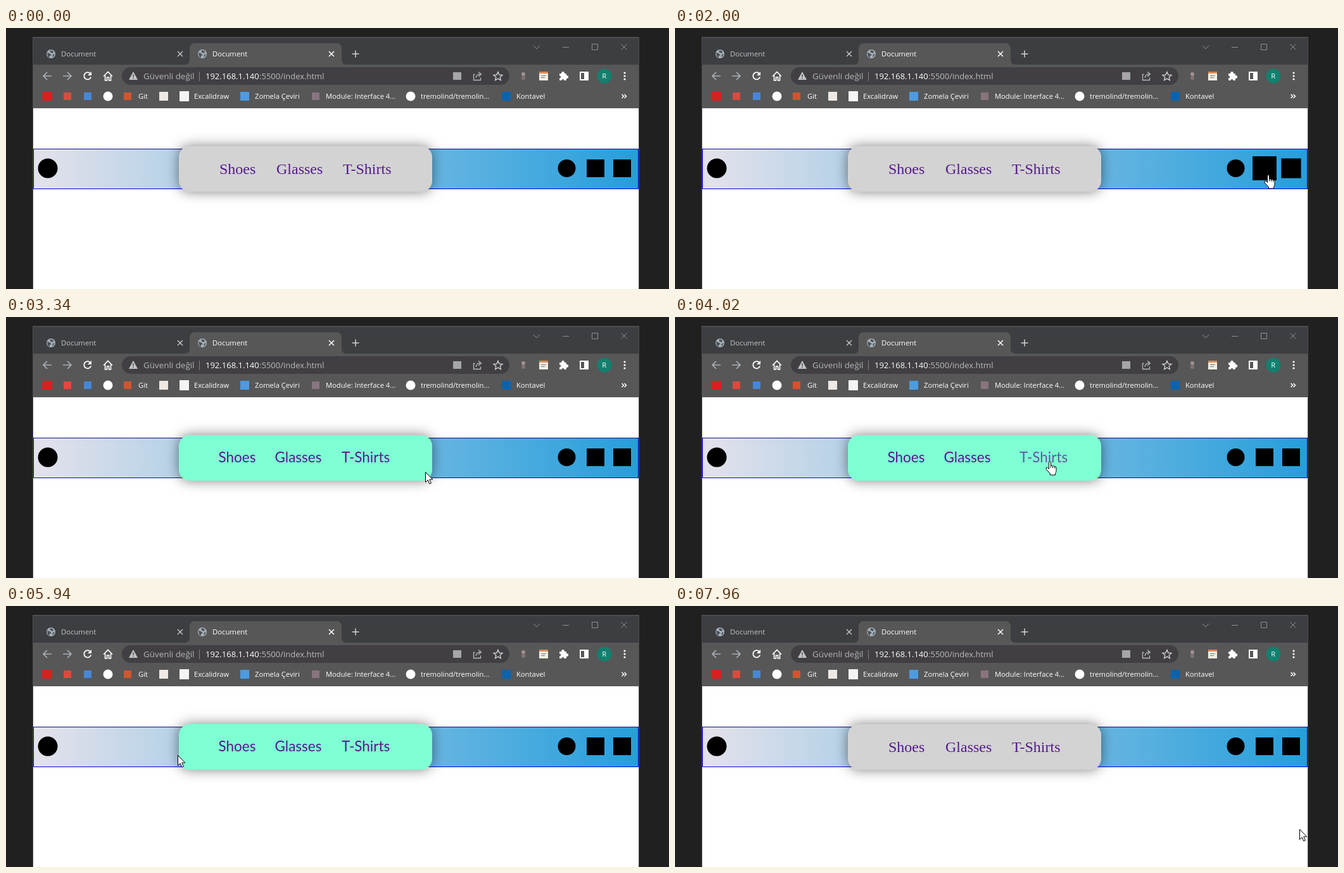
Recreate the animation shown at these times as an HTML page with a canvas. Size 1047x413 px, loop 8 s.

```html
<!DOCTYPE html>
<html lang="tr">
<head>
<meta charset="utf-8">
<title>Menu hover</title>
<style>
html, body { margin: 0; width: 100%; height: 100%; overflow: hidden; background: #202020; }
canvas { display: block; width: 1047px; height: 413px; }
</style>
</head>
<body>
<canvas id="stage"></canvas>
<script>
const W = 1047, H = 413, LOOP = 8000;
const UI = '"Open Sans", "Noto Sans", sans-serif';
const canvas = document.getElementById('stage');
const c = canvas.getContext('2d');
const dpr = window.devicePixelRatio || 1;
canvas.width = W * dpr;
canvas.height = H * dpr;

// Pointer tip: time, x, y
const path = [
  [600, 977, 379], [900, 972, 315], [1130, 965, 252], [1400, 972, 236],
  [1700, 966, 234], [1860, 945, 232], [2100, 932, 232], [2340, 928, 231],
  [2500, 904, 229], [2810, 893, 227], [2890, 868, 232], [3140, 703, 252],
  [3200, 690, 251], [3270, 672, 247], [3500, 640, 239], [3750, 605, 230],
  [4020, 592, 228], [4300, 530, 224], [4500, 498, 222], [4830, 449, 221],
  [5000, 424, 221], [5250, 392, 222], [5590, 348, 222], [5680, 335, 225],
  [5940, 271, 236], [6200, 150, 235], [6460, 73, 228], [6600, 63, 224],
  [7000, 63, 224], [7080, 130, 275], [7300, 560, 335], [7540, 979, 358],
  [7760, 979, 358], [7820, 981, 357], [7900, 981, 357], [7960, 986, 353]
];

const links = [
  { text: 'Shoes', x: 337, hx: 335.5, on: 5250, off: 5680 },
  { text: 'Glasses', x: 427, hx: 424.5, on: 4500, off: 5000 },
  { text: 'T-Shirts', x: 532, hx: 530, on: 3690, off: 4300 }
];
const icons = [
  { x: 885.5, round: true, on: 2500, off: 2890 },
  { x: 931, on: 1860, off: 2480 },
  { x: 973, on: 1260, off: 1850 }
];
const handTimes = [...links, ...icons, { on: 6420, off: 7020 }];

const clamp = v => Math.max(0, Math.min(1, v));
const ease = v => v * v * (3 - 2 * v);
const within = (t, s) => t >= s.on && t < s.off;
const hover = (t, s) => ease(clamp((t - s.on) / 220)) - ease(clamp((t - s.off) / 220));

function pointerAt(t) {
  let i = 0;
  while (i < path.length - 2 && path[i + 1][0] <= t) i++;
  const [t0, x0, y0] = path[i], [t1, x1, y1] = path[i + 1];
  const k = clamp((t - t0) / (t1 - t0));
  return [x0 + (x1 - x0) * k, y0 + (y1 - y0) * k];
}

function rect(x, y, w, h, color, r = 0) {
  c.fillStyle = color;
  c.beginPath();
  c.roundRect(x, y, w, h, r);
  c.fill();
}
function disc(x, y, r, color) {
  c.fillStyle = color;
  c.beginPath();
  c.arc(x, y, r, 0, Math.PI * 2);
  c.fill();
}
function text(s, x, y, size, color, font = UI) {
  c.font = `${size}px ${font}`;
  c.fillStyle = color;
  c.fillText(s, x, y);
}
function line(d, color, width = 1) {
  c.strokeStyle = color;
  c.lineWidth = width;
  c.stroke(new Path2D(d));
}
function shape(d, color) {
  c.fillStyle = color;
  c.fill(new Path2D(d));
}

function globe(x, y) {
  disc(x, y, 7, '#a7b0b8');
  shape(`M${x - 6} ${y - 2}l4 1 3 3-3 1v3l-3-2zM${x} ${y - 6}l4 2-1 3-3-1-2-2zM${x + 3} ${y + 1}l3-1-2 4-2 1z`, '#4b5259');
}

function tabs() {
  rect(42, 14, 958, 399, '#4d4d4d');
  rect(43, 16, 956, 42, '#3c3e42');
  rect(290, 24, 240, 40, '#575757', [8, 8, 0, 0]);
  shape('M282 58q8 0 8-8v8zM538 58q-8 0-8-8v8z', '#575757');
  globe(71, 41);
  globe(310, 41);
  text('Document', 87, 45, 11.3, '#c2c4c7');
  text('Document', 326, 45, 11.3, '#fff');
  line('M271 37l8 8m0-8l-8 8', '#c8c8c8', 1.4);
  line('M510 37l8 8m0-8l-8 8', '#fff', 1.5);
  line('M546.5 41h11M552 35.5v11', '#d2d2d2', 1.5);
  line('M833 28l5 5 5-5M879 30.5h10M925.5 25.5h9v9h-9zM971.5 25.5l9 9m0-9l-9 9', '#8d8f92');
}

function toolbar() {
  rect(43, 58, 956, 69, '#575757');
  line('M72 76H59m6-6l-6 6 6 6', '#a9b0b8', 1.7);
  line('M90 76h13m-6-6l6 6-6 6', '#a9b0b8', 1.7);
  line('M133 72a5.6 5.6 0 1 0 1.2 5.5', '#fff', 1.8);
  shape('M135 69v6h-6z', '#fff');
  line('M154 76.5l7-7 7 7M156.5 75v8h3v-5h3v5h3v-8', '#fff', 1.6);

  rect(183, 62, 612, 28, '#413f43', 14);
  shape('M201 69l7 13h-14z', '#c4c4c4');
  line('M201 73.5v4M201 78.7v1.5', '#413f43', 1.4);
  text('Güvenli değil', 217, 81, 13.4, '#b5b5b8');
  rect(305, 69, 1, 15, '#828286');
  text('192.168.1.140', 315, 81, 13, '#fff');
  text(':5500/index.html', 400, 81, 13, '#bbbbc0');
  rect(706, 70, 13, 12, '#a5a6aa');
  line('M740.5 73.5h-2v9h11v-4M742 79q1-6 7-6m-3-3.5l4.5 3.5-4.5 4', '#b9b9bd', 1.3);
  line('M777 69.5l2 4.6 5 .4-3.8 3.3 1.2 4.9-4.4-2.6-4.4 2.6 1.2-4.9-3.8-3.3 5-.4z', '#d5d5d5', 1.3);

  disc(817, 73, 3, '#a38f8f');
  rect(814, 76, 6, 6, '#7e7373', 2);
  rect(842, 69, 14, 14, '#f3eee4');
  rect(842, 69, 14, 3, '#d98b55');
  line('M845 75.5h8M845 78.5h6', '#777');
  rect(874, 72, 11, 11, '#fff', 1);
  disc(879.5, 71.5, 2.4, '#fff');
  disc(885.8, 77.5, 2.4, '#fff');
  disc(874.2, 77.5, 2, '#575757');
  disc(879.5, 83, 2, '#575757');
  line('M907 70h12v12h-12z', '#fff', 2);
  rect(913, 70, 6, 12, '#fff');
  disc(945, 76, 11.5, '#12806f');
  text('R', 941.3, 80, 11.3, '#fff');
  for (const y of [71, 76, 81]) disc(977, y, 1.6, '#fff');
}

function bookmarks() {
  rect(57, 101, 16, 14, '#d9201f', 2);
  rect(91, 102, 12, 12, '#dc4a3d');
  rect(123, 102, 12, 12, '#4687d8');
  disc(161, 108, 7.5, '#fff');
  rect(186, 102, 12, 12, '#d0552f');
  rect(242, 101, 14, 14, '#eee9e4');
  rect(274, 100, 15, 16, '#f4f4f4');
  rect(370, 101, 14, 14, '#4e9be0');
  rect(483, 102, 12, 12, '#89747f');
  disc(639, 108, 7.5, '#fff');
  rect(783, 101, 14, 14, '#0a63ae');
  const labels = [
    ['Git', 209], ['Excalidraw', 297], ['Zomela Çeviri', 393],
    ['Module: Interface 4...', 505], ['tremolind/tremolin...', 655], ['Kontavel', 806]
  ];
  for (const [s, x] of labels) text(s, x, 112, 11.2, '#fff');
  line('M972.5 105l3 3-3 3M976.5 105l3 3-3 3', '#fff', 1.5);
}

function navbar(t) {
  rect(43, 127, 956, 286, '#fff');
  const g = c.createLinearGradient(43, 0, 999, 0);
  g.addColorStop(0, '#e4e2eb');
  g.addColorStop(1, '#259edb');
  rect(43, 191, 956, 64, g);
  line('M43 191.5H999', '#10107c');
  line('M43.5 191V254.5H998.5V191', '#0000f0');
  disc(66, 222, 15.5, '#000');

  for (const icon of icons) {
    const r = 14 * (1 + 0.5 * hover(t, icon));
    if (icon.round) disc(icon.x, 222, r, '#000');
    else rect(icon.x - r, 222 - r, 2 * r, 2 * r, '#000');
  }
}

function card(t) {
  const active = t >= 3280 && t < 5990;
  c.save();
  c.shadowColor = 'rgba(0,0,0,.5)';
  c.shadowBlur = 20 * dpr;
  rect(273, 187, 400, 72, active ? '#7fffd4' : '#d3d3d3', 17);
  c.restore();
  for (const l of links) {
    if (active) {
      const h = hover(t, l);
      c.globalAlpha = 1 - 0.28 * h;
      text(l.text, l.hx + 14 * h, 230, 22.5, '#551a8b', 'Lato, sans-serif');
      c.globalAlpha = 1;
    } else {
      text(l.text, l.x, 231, 24, '#551a8b', '"Liberation Serif", serif');
    }
  }
}

const arrow = new Path2D('M.5.5v16l3.7-3.5 2.6 6 2.6-1.1-2.6-5.8h5z');
const hand = new Path2D('M-1.5 1.5q1.5-2 3 0v6q2-1.5 3 .5 2-1 3 .8 2.5-.8 2.5 1.7v5q0 2-1.5 4v2.5h-8v-2l-6-7q-1.5-2.5.5-3 1.5-.3 3.5 2.5z');

function pointer(t) {
  if (t < 600) return;
  const [x, y] = pointerAt(t);
  const shapePath = handTimes.some(s => within(t, s)) ? hand : arrow;
  c.save();
  c.translate(Math.round(x), Math.round(y));
  c.fillStyle = '#fff';
  c.strokeStyle = '#000';
  c.lineWidth = 1;
  c.lineJoin = 'round';
  c.fill(shapePath);
  c.stroke(shapePath);
  if (shapePath === hand) line('M1.5 7.5v3M4.5 8v3M7.5 9v2.5', '#000');
  c.restore();
}

function draw(now) {
  const t = now % LOOP;
  c.setTransform(dpr, 0, 0, dpr, 0, 0);
  rect(0, 0, W, H, '#202020');
  tabs();
  toolbar();
  bookmarks();
  navbar(t);
  card(t);
  pointer(t);
}

const start = performance.now();
function tick() {
  draw(performance.now() - start);
  requestAnimationFrame(tick);
}
tick();
</script>
</body>
</html>
```
